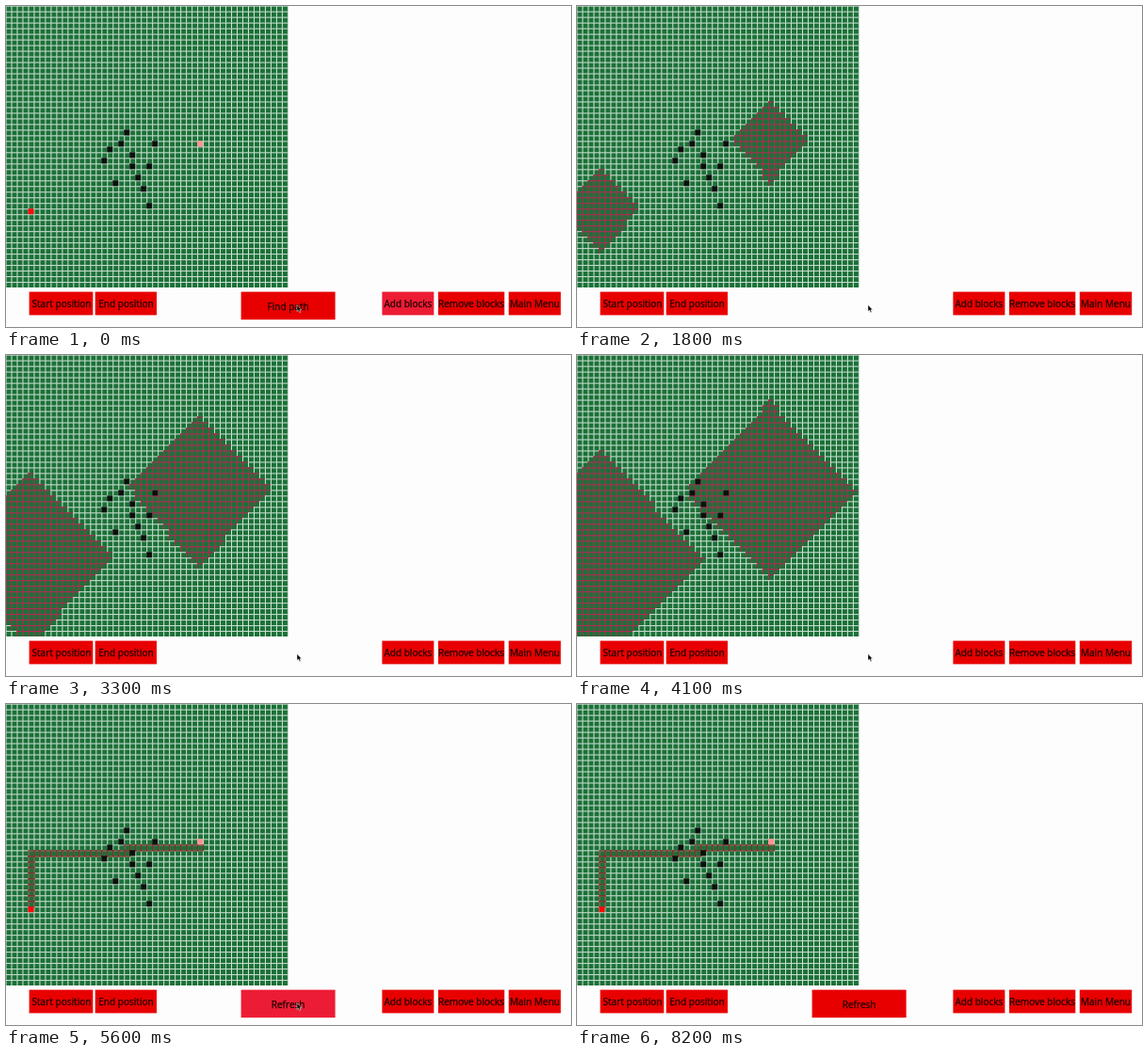
Animation, 600 px wide and 341 px high, one loop 8300 ms. Source, as an HTML page with a canvas:

```html
<!DOCTYPE html>
<html lang="en">
<head>
<meta charset="utf-8">
<title>Path finder</title>
<style>
  html, body { margin: 0; width: 100%; height: 100%; overflow: hidden; background: #fdfdfe; }
  #stage { position: relative; width: 600px; height: 341px; overflow: hidden; }
  canvas, svg { position: absolute; left: 0; top: 0; }
  rect { fill: #e80000; }
  .hover rect { fill: #ed1c35; }
  text {
    font: 500 10px "Noto Sans", sans-serif; text-anchor: middle;
    fill: #240000; stroke: #240000; stroke-width: .25px;
  }
</style>
</head>
<body>
<div id="stage">
  <canvas id="grid" width="300" height="299"></canvas>
  <svg width="600" height="341">
    <g><rect x="24.6" y="303.6" width="67.7" height="24.8"/><text x="59" y="320.3">Start position</text></g>
    <g><rect x="94.7" y="303.6" width="65.3" height="24.8"/><text x="127.5" y="320.3">End position</text></g>
    <g id="run"><rect x="249.6" y="303.6" width="100" height="29.6"/><text x="299.6" y="322.8">Find path</text></g>
    <g id="add"><rect x="399.4" y="303.6" width="55" height="24.8"/><text x="426.9" y="320.3">Add blocks</text></g>
    <g><rect x="459" y="303.6" width="70.3" height="24.8"/><text x="494" y="320.3">Remove blocks</text></g>
    <g><rect x="533.8" y="303.6" width="55.4" height="24.8"/><text x="561.5" y="320.3">Main Menu</text></g>
    <path id="cursor" d="M309 317.5v7l1.6-1.4 1.2 2.6 1.2-.6-1.1-2.4h2.1z" fill="#000" stroke="#fff" stroke-width=".5"/>
  </svg>
</div>
<script>
const LOOP = 8300, STEP = 100;
const CLICK = 1100, SEARCH = 1190, FOUND = 5500, LEAVE = 7000;
const MS_PER_CELL = 6.1;
const N = 50, PITCH = 5.988, LEFT = -.5, TOP = -.35;
const GREEN = '#1c7038', LINE = '#d0e4d6', VISITED = '#bc2656';
const start = [4, 36], end = [34, 24];
const blocks = [
  [21, 22], [20, 24], [26, 24], [18, 25], [22, 26], [17, 27],
  [22, 28], [25, 28], [23, 30], [19, 31], [24, 32], [25, 35]
];
const $ = id => document.getElementById(id);
const ctx = $('grid').getContext('2d');
const run = $('run'), add = $('add'), cursor = $('cursor');
const label = run.querySelector('text');

// Cells in the order a breadth-first search reaches them.
function flood(from) {
  const seen = new Set([...blocks, from].map(String));
  const queue = [from];
  for (let i = 0; i < queue.length; i++) {
    const [x, y] = queue[i];
    for (const [dx, dy] of [[0, -1], [0, 1], [-1, 0], [1, 0]]) {
      const next = [x + dx, y + dy];
      if (next.some(v => v < 0 || v >= N) || seen.has(String(next))) continue;
      seen.add(String(next));
      queue.push(next);
    }
  }
  return queue;
}

function route(...corners) {
  const cells = [corners[0]];
  for (const [tx, ty] of corners.slice(1)) {
    let [x, y] = cells[cells.length - 1];
    while (x !== tx || y !== ty) {
      x += Math.sign(tx - x);
      y += Math.sign(ty - y);
      cells.push([x, y]);
    }
  }
  return cells;
}

const floods = [flood(start), flood(end)];
const path = route([4, 35], [4, 26], [21, 26], [21, 25], [34, 25]);
const px = x => x * PITCH + LEFT;
const py = y => y * PITCH + TOP;

function rect(color, x, y, w, h) {
  ctx.fillStyle = color;
  ctx.fillRect(x, y, w, h);
}

function fillCell([x, y], color) {
  rect(color, px(x), py(y), 6, 6);
}

// Each cell owns its left and top line.
function drawGrid(visited) {
  rect(GREEN, 0, 0, 300, 299);
  for (let y = 0; y < N; y++) {
    for (let x = 0; x < N; x++) {
      const color = visited.has(`${x},${y}`) ? VISITED : LINE;
      rect(color, px(x), py(y), 1, PITCH);
      rect(color, px(x), py(y), PITCH, 1);
    }
  }
  rect(LINE, px(N), 0, 1, 299);
}

function drawStep([x, y]) {
  ctx.strokeStyle = '#7a3029';
  ctx.lineWidth = 1.2;
  ctx.strokeRect(px(x) + .5, py(y) + .5, PITCH, PITCH);
}

function render(t) {
  const found = t >= FOUND;
  const count = found ? 0 : Math.max(0, Math.floor((t - SEARCH) / MS_PER_CELL) + 1);
  drawGrid(new Set(floods.flatMap(cells => cells.slice(0, count)).map(String)));
  if (found) path.forEach(drawStep);
  blocks.forEach(b => fillCell(b, '#0a0f0b'));
  if (!count) {
    fillCell(start, '#fa0a0a');
    fillCell(end, '#ff9494');
  }

  label.textContent = found ? 'Refresh' : 'Find path';
  run.style.visibility = t < CLICK || found ? 'visible' : 'hidden';
  run.classList.toggle('hover', t >= STEP && t < LEAVE);
  add.classList.toggle('hover', t < STEP);
  cursor.style.visibility = t < LEAVE ? 'visible' : 'hidden';
}

let last = -1;
function tick(now) {
  const t = Math.floor(now % LOOP / STEP) * STEP;
  if (t !== last) render(last = t);
  requestAnimationFrame(tick);
}
render(0);
requestAnimationFrame(tick);
</script>
</body>
</html>
```
